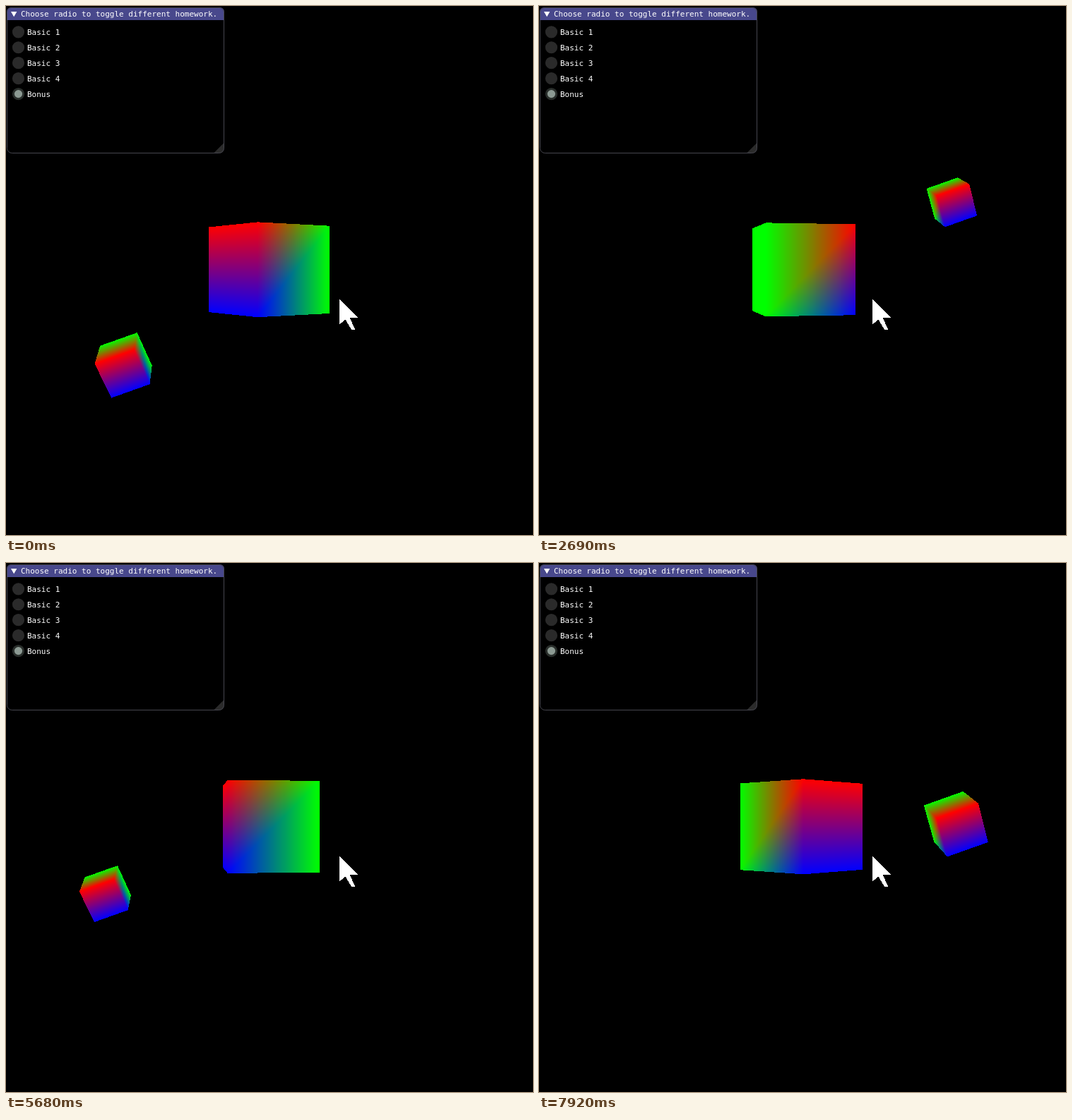
These frames come from a looping animation (746 by 750 pixels, 7990 ms). An HTML page with a canvas:

```html
<!DOCTYPE html>
<html lang="en">
<head>
<meta charset="utf-8">
<title>Orbiting cubes</title>
<style>
  html, body { margin: 0; width: 100%; height: 100%; overflow: hidden; background: #000; }
  canvas, svg { position: absolute; left: 0; top: 0; display: block; }
  text { font: 11px "DejaVu Sans Mono", monospace; fill: #fff; white-space: pre; }
</style>
</head>
<body>
<canvas id="scene" width="746" height="750"></canvas>
<svg id="ui" width="746" height="750" viewBox="0 0 746 750">
  <path d="M1 20V9Q1 2 8 2H302Q309 2 309 9V20Z" fill="#48488c"/>
  <path d="M294 208.5L308.5 194V202Q308.5 208.5 302 208.5Z" fill="#2b2b2b"/>
  <rect x="1.5" y="2.5" width="307" height="206" rx="7" fill="none" stroke="#46464f"/>
  <path d="M7 8H15.4L11.2 15.2Z" fill="#fff"/>
  <text x="21" y="15">Choose radio to toggle different homework.</text>
  <g id="radios"></g>
  <path d="M472 415.5L498.5 442H486.5L494.5 459H489L480.5 444.5L472 451.5Z" fill="#fff" shape-rendering="crispEdges"/>
</svg>
<script>
const W = 746, H = 750, CX = 371.3, CY = 373.8;
const DIST = 925;                     // camera distance; one unit is one pixel at depth 0
const LOOP = 7990, STEP = 76.9, LAST = 103;
const BIG = 61.2, SMALL = 24.6, ORBIT = 245;
const TURN = 4.473;                   // degrees per step
const BIG_START = -54, ORBIT_START = -57.5;

const ctx = document.getElementById('scene').getContext('2d');
const image = ctx.createImageData(W, H);
const pixels = image.data;

const RED = [255, 0, 0], GREEN = [0, 255, 0], BLUE = [0, 0, 255];
// Corner bits: 1 = right, 2 = bottom, 4 = front.
const COLORS = [GREEN, GREEN, GREEN, GREEN, RED, RED, BLUE, BLUE];
// Each face seen from outside: top left, bottom left, bottom right, top right.
const FACES = [[4, 6, 7, 5], [5, 7, 3, 1], [0, 2, 6, 4], [1, 3, 2, 0], [0, 4, 5, 1], [6, 2, 3, 7]];

const rad = deg => deg * Math.PI / 180;

// Axes [right, down, front] for a turn about the vertical.
function spin(deg) {
  const c = Math.cos(rad(deg)), s = Math.sin(rad(deg));
  return [[c, 0, -s], [0, 1, 0], [s, 0, c]];
}

// Axes for a roll in the picture plane plus a lean towards the viewer.
function tilt(roll, pitch) {
  const c = Math.cos(rad(roll)), s = Math.sin(rad(roll));
  const cp = Math.cos(rad(pitch)), sp = Math.sin(rad(pitch));
  return [[c, -s, 0], [s * cp, c * cp, -sp], [s * sp, c * sp, cp]];
}

const SMALL_AXES = tilt(19.6, 20);
const ORBIT_AXES = tilt(21.2, 20);

function place(center, axes, a, b, c) {
  return center.map((v, k) => v + a * axes[0][k] + b * axes[1][k] + c * axes[2][k]);
}

function project([x, y, z]) {
  const scale = DIST / (DIST - z);
  return { x: CX + x * scale, y: CY + y * scale, scale };
}

const cross = (a, b, x, y) => (b.x - a.x) * (y - a.y) - (b.y - a.y) * (x - a.x);

function drawTriangle(a, b, c) {
  const area = cross(a, b, c.x, c.y);
  if (area >= 0) return;              // faces away
  const xs = [a.x, b.x, c.x], ys = [a.y, b.y, c.y];
  const x0 = Math.floor(Math.min(...xs)), x1 = Math.ceil(Math.max(...xs));
  const y0 = Math.floor(Math.min(...ys)), y1 = Math.ceil(Math.max(...ys));
  for (let y = y0; y < y1; y++) {
    for (let x = x0; x < x1; x++) {
      const px = x + 0.5, py = y + 0.5;
      let u = cross(b, c, px, py) / area;
      let v = cross(c, a, px, py) / area;
      let w = 1 - u - v;
      if (u < 0 || v < 0 || w < -1e-9) continue;
      u *= a.scale; v *= b.scale; w *= c.scale;
      const sum = u + v + w, at = (y * W + x) * 4;
      for (let k = 0; k < 3; k++) {
        pixels[at + k] = (u * a.color[k] + v * b.color[k] + w * c.color[k]) / sum;
      }
    }
  }
}

function drawCube({ center, axes, half }) {
  const corners = COLORS.map((color, i) => {
    const sign = bit => (i & bit ? half : -half);
    return { ...project(place(center, axes, sign(1), sign(2), sign(4))), color };
  });
  for (const face of FACES) {
    const [tl, bl, br, tr] = face.map(i => corners[i]);
    drawTriangle(tl, bl, tr);
    drawTriangle(bl, br, tr);
  }
}

function render(step) {
  pixels.fill(0);
  for (let i = 3; i < pixels.length; i += 4) pixels[i] = 255;
  const angle = step * TURN, phase = rad(angle + ORBIT_START);
  const orbit = place([0, 0, 0], ORBIT_AXES, ORBIT * Math.sin(phase), 0, ORBIT * Math.cos(phase));
  const cubes = [
    { center: [0, 0, 0], axes: spin(angle + BIG_START), half: BIG },
    { center: orbit, axes: SMALL_AXES, half: SMALL }
  ];
  cubes.sort((p, q) => p.center[2] - q.center[2]).forEach(drawCube);
  ctx.putImageData(image, 0, 0);
}

const labels = ['Basic 1', 'Basic 2', 'Basic 3', 'Basic 4', 'Bonus'];
document.getElementById('radios').innerHTML = labels.map((label, i) => {
  const y = 36.8 + i * 21.95, on = label === 'Bonus';
  return `<circle cx="17.5" cy="${y}" r="8.6" fill="${on ? '#292e2b' : '#2a2a2a'}"/>` +
    (on ? `<circle cx="17.5" cy="${y}" r="5.6" fill="#8c9a93"/>` : '') +
    `<text x="30" y="${Math.round(y + 4)}">${label}</text>`;
}).join('');

let shown = -1;
const start = performance.now();
function tick() {
  const t = (performance.now() - start) % LOOP;
  const step = Math.min(LAST, Math.floor((t + 18) / STEP));
  if (step !== shown) render(shown = step);
  requestAnimationFrame(tick);
}
tick();
</script>
</body>
</html>
```
